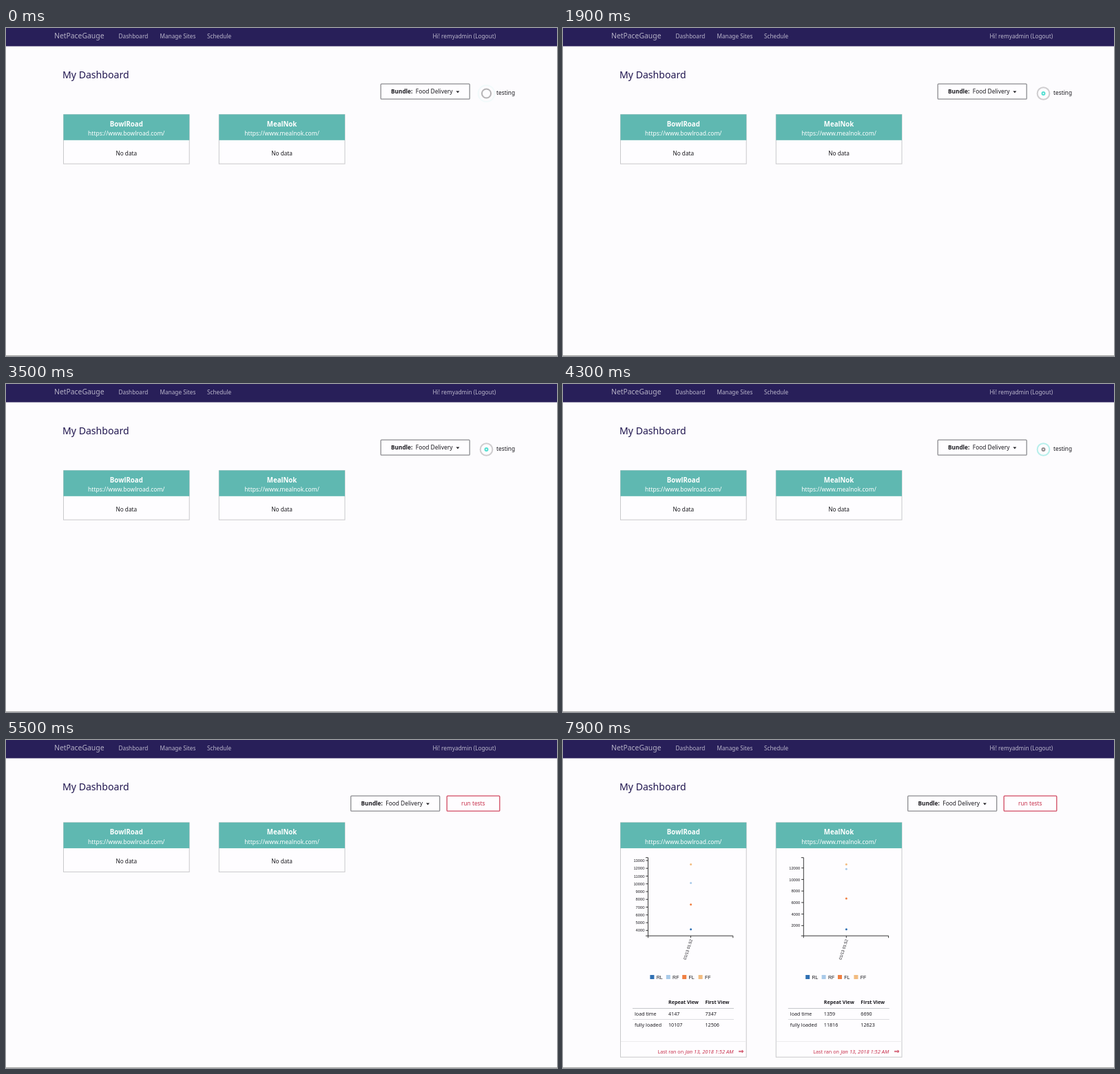
These frames come from a looping animation (800 px wide and 476 px high, 8 s). An HTML page:

```html
<!DOCTYPE html>
<html lang="en">
<head>
<meta charset="utf-8">
<title>Dashboard</title>
<style>
html, body { margin: 0; width: 100%; height: 100%; overflow: hidden; background: #fdfcfe; }
svg { display: block; font-family: "Noto Sans", "Open Sans", sans-serif; font-size: 8.25px; fill: #1c1b20; }
.axis { font-family: "Liberation Sans", Arial, sans-serif; }
</style>
</head>
<body>
<svg id="stage" width="800" height="476" viewBox="0 0 800 476"></svg>
<script>
const LOOP = 8000, STEP = 100, DONE = 4800, LOADED = 5800;
const PERIOD = 1600, PHASE = 0.8825, RADIUS = 12.4;

const text = (x, y, s, attrs = '') => `<text x="${x}" y="${y}" ${attrs}>${s}</text>`;
const rect = (x, y, w, h, attrs) => `<rect x="${x}" y="${y}" width="${w}" height="${h}" ${attrs}/>`;
const path = (d, color, w = 1) => `<path d="${d}" fill="none" stroke="${color}" stroke-width="${w}"/>`;
const size = (px, more = '') => `style="font-size:${px}px;${more}"`;
const bold = 'font-weight="700"', mid = 'text-anchor="middle"', end = 'text-anchor="end"';

// All card drawings use the first card's coordinates and are shifted sideways.
const cards = [
  { dx: 0, name: 'BowlRoad', url: 'https://www.bowlroad.com/',
    values: [4147, 10107, 7347, 12506], ticks: [4000, 13000, 1000] },
  { dx: 225.8, name: 'MealNok', url: 'https://www.mealnok.com/',
    values: [1359, 11816, 6690, 12623], ticks: [2000, 12000, 2000] }
];
const series = [['RL', '#3070b3'], ['RF', '#a9cae9'], ['FL', '#f07f42'], ['FF', '#f2bc80']];

const border = h => rect(83.5, 119.9, 182.7, h, 'fill="#fefdff" stroke="#c9c9cb"');

const header = c =>
  rect(83.5, 119.7, 182.7, 37.4, 'fill="#5fb8b1"') +
  text(174.8, 137.3, c.name, `${mid} ${bold} fill="#fff" ${size(9.7)}`) +
  text(174.8, 150.6, c.url, `${mid} font-weight="500" fill="#fff" ${size(8.5)}`);

const emptyCard = c => `<g transform="translate(${c.dx} 0)">` + border(71.5) + header(c) +
  text(174.8, 179.1, 'No data', mid) + '</g>';

function chart({ values, ticks: [from, to, step] }) {
  const lo = Math.min(...values), hi = Math.max(...values);
  const y = v => 274.7 - (v - lo) / (hi - lo) * 94.2;
  let out = path('M120 170.7H123.5V284.2H120M123.5 287.2V284.2H246.8V287.2M185.5 284.2V287.2', '#222', 0.9);
  for (let v = from; v <= to; v += step) {
    out += path(`M120.3 ${y(v)}H123.5`, '#222', 0.9) + text(118.5, y(v) + 2.1, v, `${end} ${size(5.8)}`);
  }
  out += text(0, 0, '01/13 01:52', `${end} transform="translate(188 290) rotate(-72)" ${size(5.8)}`);
  series.forEach(([label, color], i) => {
    const x = 126.4 + i * 23.4;
    out += `<circle cx="185.6" cy="${y(values[i])}" r="1.5" fill="${color}"/>` +
      rect(x, 341, 6, 6, `fill="${color}"`) + text(x + 9.3, 346.7, label, size(7));
  });
  return `<g class="axis">${out}</g>`;
}

function table([rl, rf, fl, ff]) {
  const row = (y, cells, attrs = '') =>
    cells.map((s, i) => text([104, 153, 206.5][i], y, s, `${attrs} ${size(7.15)}`)).join('');
  return row(383.3, ['', 'Repeat View', 'First View'], bold) + path('M101 389.5H248', '#c6c8cc') +
    row(400.3, ['load time', rl, fl]) + path('M101 405.5H248', '#dcdde0') +
    row(416.4, ['fully loaded', rf, ff]);
}

const footer = path('M84 437.5H266', '#ececee') +
  text(137.5, 455.2, 'Last ran on', `fill="#c8324d" ${size(7.2)}`) +
  text(177.5, 455.2, 'Jan 13, 2018 1:52 AM', `fill="#c8324d" font-style="italic" ${size(7.5)}`) +
  text(254.6, 455.2, '⇒', `fill="#c8324d" ${bold} ${size(9.5, 'font-family:DejaVu Sans,sans-serif')}`);

const fullCard = c => `<g transform="translate(${c.dx} 0)">` + border(340.3) + header(c) +
  chart(c) + table(c.values) + footer + '</g>';

const nav = [[163.5, 'Dashboard'], [223.5, 'Manage Sites'], [292, 'Schedule'], [619.5, 'Hi! remyadmin (Logout)']];

document.getElementById('stage').innerHTML =
  rect(0, 0, 800, 26.5, 'fill="#281f59"') +
  text(70, 15.3, 'NetPaceGauge', `fill="#b5b1c6" ${size(10.4)}`) +
  nav.map(([x, s]) => text(x, 14.6, s, 'fill="#bbb7cc"')).join('') +
  text(82, 72.6, 'My Dashboard', `fill="#20164f" ${size(14.1)}`) +
  path('M0 475.5H800', '#a3a3a3') +
  '<g id="bundle">' +
    rect(544.2, 81.2, 129, 22, 'rx="1" fill="#fefdff" stroke="#8c8c90" stroke-width="1.3"') +
    text(559, 95.2, 'Bundle:', bold) + text(594.8, 95.2, 'Food Delivery', size(8.4)) +
    '<path d="M653.4 91.6h5l-2.5 2.7z"/></g>' +
  '<g id="busy"><circle id="ringA" cx="697.5" cy="95" fill="none" stroke="#4fded0" stroke-width="2"/>' +
    '<circle id="ringB" cx="697.5" cy="95" fill="none" stroke="#8e8b8d" stroke-width="2"/>' +
    text(712, 97.3, 'testing', size(8.3)) + '</g>' +
  '<g id="ready">' + rect(640.2, 81.2, 76.6, 22, 'rx="1" fill="#fefdff" stroke="#d14a62" stroke-width="1.3"') +
    text(678.3, 95.2, 'run tests', `${mid} fill="#c8324d" ${size(8.3)}`) + '</g>' +
  `<g id="empty">${cards.map(emptyCard).join('')}</g>` +
  `<g id="full">${cards.map(fullCard).join('')}</g>`;

const el = Object.fromEntries(
  ['bundle', 'busy', 'ready', 'empty', 'full', 'ringA', 'ringB'].map(id => [id, document.getElementById(id)]));
const show = (node, on) => node.setAttribute('display', on ? 'inline' : 'none');

// Cubic Bezier easing, solved by bisection.
function ease(x1, y1, x2, y2, x) {
  const at = (a, b, u) => 3 * (1 - u) ** 2 * u * a + 3 * (1 - u) * u * u * b + u ** 3;
  let lo = 0, hi = 1;
  for (let i = 0; i < 24; i++) {
    const u = (lo + hi) / 2;
    if (at(x1, x2, u) < x) lo = u; else hi = u;
  }
  return at(y1, y2, lo);
}

function ripple(ring, phase) {
  const p = phase % 1;
  ring.setAttribute('r', RADIUS * ease(0, 0.2, 0.8, 1, p));
  ring.setAttribute('opacity', 1 - ease(0.2, 0, 0.8, 1, p));
}

const start = performance.now();
function draw() {
  const t = Math.floor((performance.now() - start) % LOOP / STEP) * STEP;
  const done = t >= DONE, loaded = t >= LOADED;
  show(el.busy, !done);
  show(el.ready, done);
  show(el.empty, !loaded);
  show(el.full, loaded);
  el.bundle.setAttribute('transform', `translate(${done ? -43.5 : 0} 0)`);
  el.empty.setAttribute('transform', `translate(0 ${done ? 0 : 5.7})`);
  ripple(el.ringA, t / PERIOD + PHASE);
  ripple(el.ringB, t / PERIOD + PHASE + 0.5);
  requestAnimationFrame(draw);
}
draw();
</script>
</body>
</html>
```
